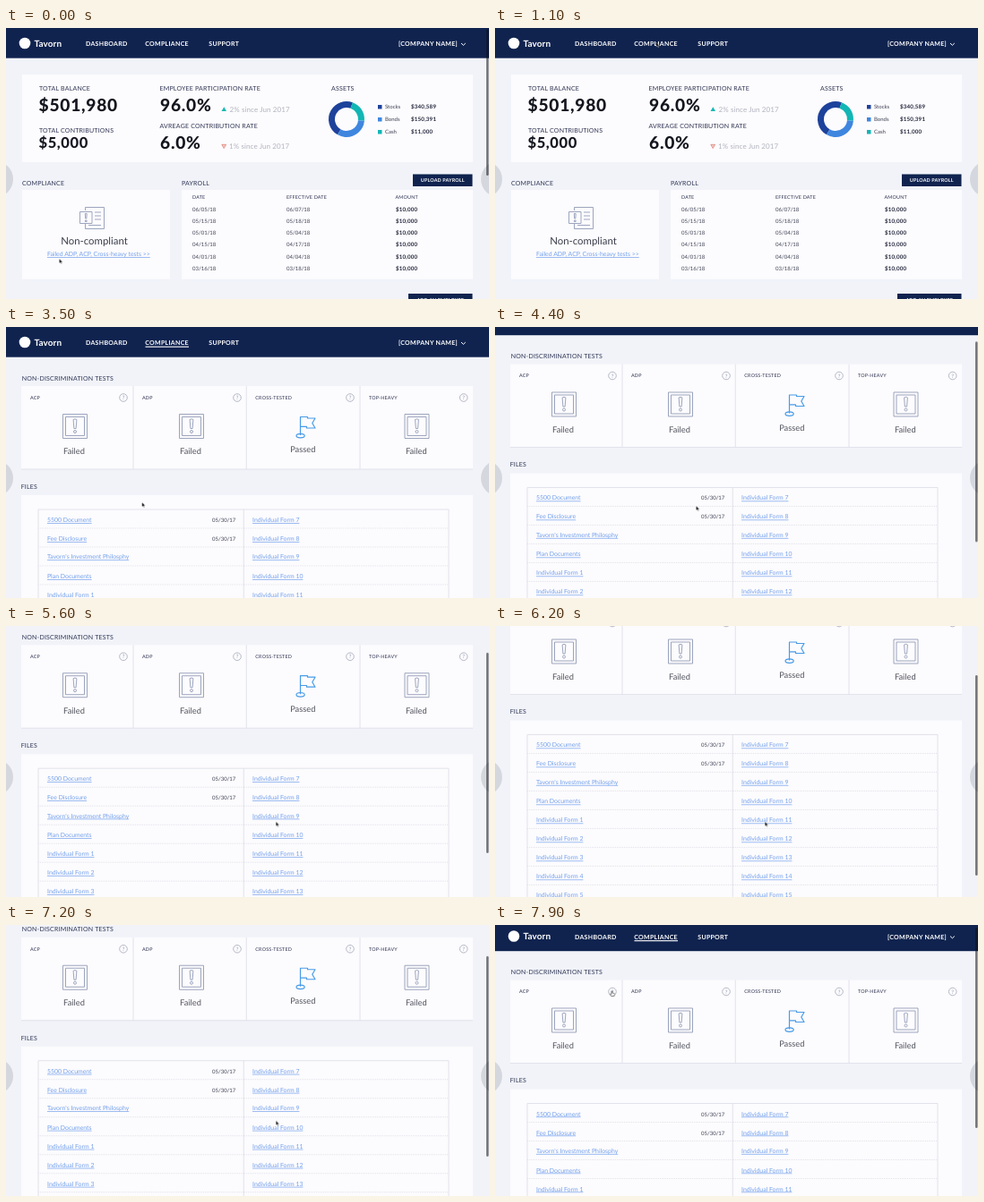
Recreate the animation shown at these times as an HTML page. Size 539 by 303 pixels, loop 8 s.

```html
<!DOCTYPE html>
<html lang="en">
<head>
<meta charset="utf-8">
<title>Plan dashboard</title>
<style>
html, body { margin: 0; width: 100%; height: 100%; overflow: hidden; background: #f1f3f9; }
svg { display: block; width: 539px; height: 303px; }
text { font-family: Lato, "Open Sans", sans-serif; font-size: 7px; fill: #2f3554; text-rendering: geometricPrecision; white-space: pre; }
.caps { letter-spacing: .2px; }
.nav { font-weight: 700; letter-spacing: .28px; fill: #fff; }
.brand { font-size: 10px; font-weight: 700; letter-spacing: .1px; fill: #fff; }
.big { font-size: 19.2px; font-weight: 800; letter-spacing: .75px; fill: #14161f; }
.mid { font-size: 16.5px; letter-spacing: .6px; }
.note { font-size: 8px; letter-spacing: .1px; fill: #b2b5c0; }
.small { font-size: 6px; fill: #3c4054; }
.sum { font-size: 6.2px; font-weight: 700; letter-spacing: .2px; fill: #20243a; }
.head { font-size: 5.4px; letter-spacing: .2px; }
.btn { font-size: 5.4px; font-weight: 700; letter-spacing: .15px; fill: #fff; text-anchor: middle; }
.state { font-size: 11.4px; fill: #3b3e4c; text-anchor: middle; }
.result { font-size: 9.3px; fill: #52555f; text-anchor: middle; }
.link { font-size: 6.9px; fill: #72a0ed; text-decoration: underline; text-decoration-thickness: .5px; }
.help { font-size: 6px; fill: #9299ab; text-anchor: middle; }
.line { fill: none; stroke: #dcdee7; stroke-width: .8; }
.row { fill: none; stroke: #dcdee7; stroke-width: .8; stroke-dasharray: 1 1; }
.icon { fill: none; stroke: #929cb8; stroke-width: .9; }
.ring { fill: none; stroke: #a3a9ba; stroke-width: .8; }
.flag { fill: none; stroke: #489ce8; stroke-width: 1.2; stroke-linejoin: round; }

#home, #tests, #scroller, #bar, #homebar, #cursor, #arrow, #hand { animation: 8s linear infinite; }
#home { animation-name: leave; }
#tests { animation-name: enter; }
#scroller { --k: -1px; animation-name: scroll; }
#thumb { --k: .667px; animation: scroll 8s linear infinite; }
#bar { animation-name: barIn; }
#homebar { animation-name: barOut; }
#cursor { animation-name: point; }
#arrow { animation-name: arrow; }
#hand { animation-name: hand; }

@keyframes leave { 0%, 16.24% { visibility: visible } 16.25%, 100% { visibility: hidden } }
@keyframes enter { 0%, 16.24% { visibility: hidden } 16.25%, 100% { visibility: visible } }
@keyframes barOut { 0%, 3% { opacity: 1 } 8%, 100% { opacity: 0 } }
@keyframes barIn { 0%, 47.5% { opacity: 0 } 48.75%, 100% { opacity: 1 } }
@keyframes arrow { 0%, 96.8% { opacity: 1 } 96.81%, 100% { opacity: 0 } }
@keyframes hand { 0%, 96.8% { opacity: 0 } 96.81%, 100% { opacity: 1 } }
@keyframes scroll {
  0%, 48.75% { transform: translateY(0); animation-timing-function: cubic-bezier(.3, .2, .4, 1) }
  55% { transform: translateY(calc(24.5 * var(--k))); animation-timing-function: ease-out }
  63.75%, 66.5% { transform: translateY(calc(26 * var(--k))); animation-timing-function: cubic-bezier(.4, .1, .4, 1) }
  77.5% { transform: translateY(calc(82.5 * var(--k))); animation-timing-function: ease-out }
  81.25%, 84% { transform: translateY(calc(83 * var(--k))); animation-timing-function: cubic-bezier(.5, 0, .8, .7) }
  90% { transform: translateY(calc(52.5 * var(--k))); animation-timing-function: cubic-bezier(.2, .4, .4, 1) }
  95%, 100% { transform: translateY(calc(4.5 * var(--k))) }
}
@keyframes point {
  0%, 1.25% { transform: translate(59.5px, 258px); animation-timing-function: ease-in-out }
  11.5%, 16.5% { transform: translate(180px, 16px); animation-timing-function: ease-in-out }
  23.75%, 34% { transform: translate(73.7px, 249.5px); animation-timing-function: ease-in-out }
  43.75%, 46% { transform: translate(151.7px, 196px); animation-timing-function: ease-in-out }
  55%, 57.5% { transform: translate(224.5px, 200px); animation-timing-function: ease-in-out }
  63.75%, 90.3% { transform: translate(301.3px, 218.7px); animation-timing-function: ease-in-out }
  97%, 100% { transform: translate(130.5px, 74px) }
}
</style>
</head>
<body>
<svg viewBox="0 0 539 303">
  <rect width="539" height="303" fill="#f1f3f9"/>
  <g id="scroller">
    <rect width="539" height="33.7" fill="#10234f"/>
    <circle cx="21" cy="17" r="6.3" fill="#fff"/>
    <g id="nav"></g>
    <path d="M508 17l2.4 2.3 2.4-2.3" fill="none" stroke="#fff"/>
    <g id="home"></g>
    <g id="tests"></g>
  </g>
  <g fill="#d5d7de">
    <circle cx="-12" cy="169" r="20"/>
    <circle cx="550" cy="169" r="20"/>
  </g>
  <g fill="#0c0e14" fill-opacity=".55">
    <rect id="homebar" x="536" y="1" width="2.6" height="164" rx="1.3"/>
    <g id="bar"><rect id="thumb" x="536" y="0" width="2.6" height="224" rx="1.3"/></g>
  </g>
  <g id="cursor">
    <path id="arrow" d="M0 0V5L1.2 4 2 5.8 2.8 5.4 2 3.7H3.5Z" fill="#111" stroke="#fff" stroke-width=".3"/>
    <path id="hand" d="M-.6 0Q0-.7.6 0V2L2.6 2.5Q3.2 2.8 3 3.6L2.4 5.6H-.8L-2.2 3.4Q-1.6 2.6-.6 3.5Z" fill="#fff" stroke="#333" stroke-width=".6"/>
  </g>
</svg>
<script>
const text = (x, y, cls, s) => `<text x="${x}" y="${y}" class="${cls}">${s}</text>`;
const rect = (x, y, w, h, fill) => `<rect x="${x}" y="${y}" width="${w}" height="${h}" fill="${fill}"/>`;
const path = (d, cls) => `<path d="${d}" class="${cls}"/>`;
const panel = (x, y, w, h) => rect(x, y, w, h, '#fcfbfd');
const button = (x, y, w, s) => rect(x, y, w, 13.5, '#10234f') + text(x + w / 2, y + 8.7, 'btn', s);
const put = (id, ...parts) => { document.getElementById(id).innerHTML = parts.flat().join(''); };

const arc = (from, to, color) =>
  `<circle cx="380" cy="102" r="16.5" fill="none" stroke="${color}" stroke-width="7" pathLength="360"
    stroke-dasharray="${to - from} 360" transform="rotate(${from - 90} 380 102)"/>`;

const asset = ([name, sum, color], i) => {
  const y = 88 + i * 14;
  return rect(415, y - 2, 4.5, 4.5, color) + text(423, y + 2.2, 'small', name) + text(452, y + 2.2, 'sum', sum);
};

const payment = ([date, effective], i) => {
  const y = 204.8 + i * 13.2;
  return text(208, y, 'small', date + '/18') + text(313, y, 'small', effective + '/18') + text(435, y, 'sum', '$10,000');
};

put('nav',
  text(31.5, 20.7, 'brand', 'Tavorn'),
  text(89, 20, 'nav', 'DASHBOARD'),
  text(155.3, 20, 'nav', 'COMPLIANCE'),
  text(226.3, 20, 'nav', 'SUPPORT'),
  text(438, 20, 'nav', '[COMPANY NAME]'));

put('home',
  panel(18, 52, 503, 98),
  text(37, 70, 'caps', 'TOTAL BALANCE'),
  text(36.5, 93.2, 'big', '$501,980'),
  text(37, 116.5, 'caps', 'TOTAL CONTRIBUTIONS'),
  text(36.5, 134.3, 'big mid', '$5,000'),
  text(171.5, 70, 'caps', 'EMPLOYEE PARTICIPATION RATE'),
  text(172, 93.2, 'big', '96.0%'),
  text(171.5, 111.7, 'caps', 'AVREAGE CONTRIBUTION RATE'),
  text(172, 134.5, 'big', '6.0%'),
  '<path d="M240.5 93L243.3 88.2 246 93Z" fill="#18b9b3"/>',
  '<path d="M240.8 130.3H245.6L243.2 134.6Z" fill="#f6c9c4" stroke="#d97a72" stroke-width=".7"/>',
  text(249.5, 93.5, 'note', '2% since Jun 2017'),
  text(249, 135, 'note', '1% since Jun 2017'),
  text(363, 70, 'caps', 'ASSETS'),
  arc(210, 380, '#1d429b'), arc(20, 95, '#12b6b5'), arc(95, 210, '#3f86df'),
  [['Stocks', '$340,589', '#1d429b'], ['Bonds', '$150,391', '#3f86df'], ['Cash', '$11,000', '#12b6b5']].map(asset),

  text(18, 176, 'caps', 'COMPLIANCE'),
  panel(18, 181, 165, 100),
  path('M88.5 204V200.5H109.5V224.5H88.5V219M99 206H106M99 210H106M99 214H106M92 220.5H106', 'icon'),
  path('M82.5 205.5H96V218.5H82.5ZM88.3 207.5H90.2L89.8 213H88.7ZM88.4 215H90.1V216.5H88.4Z', 'icon'),
  text(98.5, 241.5, 'state', 'Non-compliant'),
  text(46, 255, 'link', 'Failed ADP, ACP, Cross-heavy tests &gt;&gt;'),

  text(196, 176, 'caps', 'PAYROLL'),
  button(454, 163.5, 66.5, 'UPLOAD PAYROLL'),
  panel(196, 181, 325, 100),
  text(208, 191, 'head', 'DATE'), text(313, 191, 'head', 'EFFECTIVE DATE'), text(434.5, 191, 'head', 'AMOUNT'),
  [['06/05', '06/07'], ['05/15', '05/18'], ['05/01', '05/04'], ['04/15', '04/17'], ['04/01', '04/04'], ['03/16', '03/18']].map(payment),
  button(449, 297, 71.5, 'ADD AN EMPLOYEE'));

const warning = x => path(
  `M${x - 13.5} 97.5h27v27h-27zM${x - 10.5} 100.5h21v21h-21z` +
  `M${x - 1.9} 103.5q1.9-1.4 3.8 0l-.8 10h-2.2zM${x - 1.5} 117a1.5 1.5 0 1 0 3 0a1.5 1.5 0 1 0-3 0z`, 'icon');

const flag = path('M328.5 121V100.5H336.5V102H345L341.8 107.5 345 113H335.5V111.3H328.5', 'flag') +
  '<ellipse cx="328.6" cy="121.6" rx="4.6" ry="2.3" class="flag"/>';

const test = ([name, left, helpX, iconX, labelX], i) => [
  text(left, 80.9, 'head', name),
  `<circle cx="${helpX}" cy="79" r="4.3" class="ring"/>`,
  text(helpX, 81.2, 'help', '?'),
  i === 2 ? flag : warning(iconX),
  text(labelX, i === 2 ? 140.3 : 142.3, 'result', i === 2 ? 'Passed' : 'Failed'),
  i ? path(`M${left - 10} 66V159`, 'line') : ''
].join('');

const files = ['5500 Document', 'Fee Disclosure', 'Tavorn\'s Investment Philosphy', 'Plan Documents'];
const fileRow = (_, i) => {
  const top = 204 + i * 21, y = top + (i === 2 ? 13.4 : 14);
  return path(`M36 ${top}H494`, i ? 'row' : 'line') +
    text(46, y, 'link', files[i] || `Individual Form ${i - 3}`) +
    (i < 2 ? text(230, y, 'small', '05/30/17') : '') +
    text(275, y, 'link', `Individual Form ${i + 7}`);
};

put('tests',
  rect(155.5, 21.6, 48.5, 1.1, '#fff'),
  text(17.7, 59.5, 'caps', 'NON-DISCRIMINATION TESTS'),
  panel(17, 66, 504, 93),
  path('M17 159H521', 'line'),
  [['ACP', 27, 131, 77, 76], ['ADP', 152, 258, 207, 206], ['CROSS-TESTED', 278.3, 384, 335, 331.3], ['TOP-HEAVY', 405, 510.7, 458.5, 457.8]].map(test),
  text(16.7, 180.8, 'caps', 'FILES'),
  panel(17, 188, 504, 240),
  Array.from({ length: 10 }, fileRow),
  path('M36 204V414H494V204M265.3 204V414', 'line'));
</script>
</body>
</html>
```
